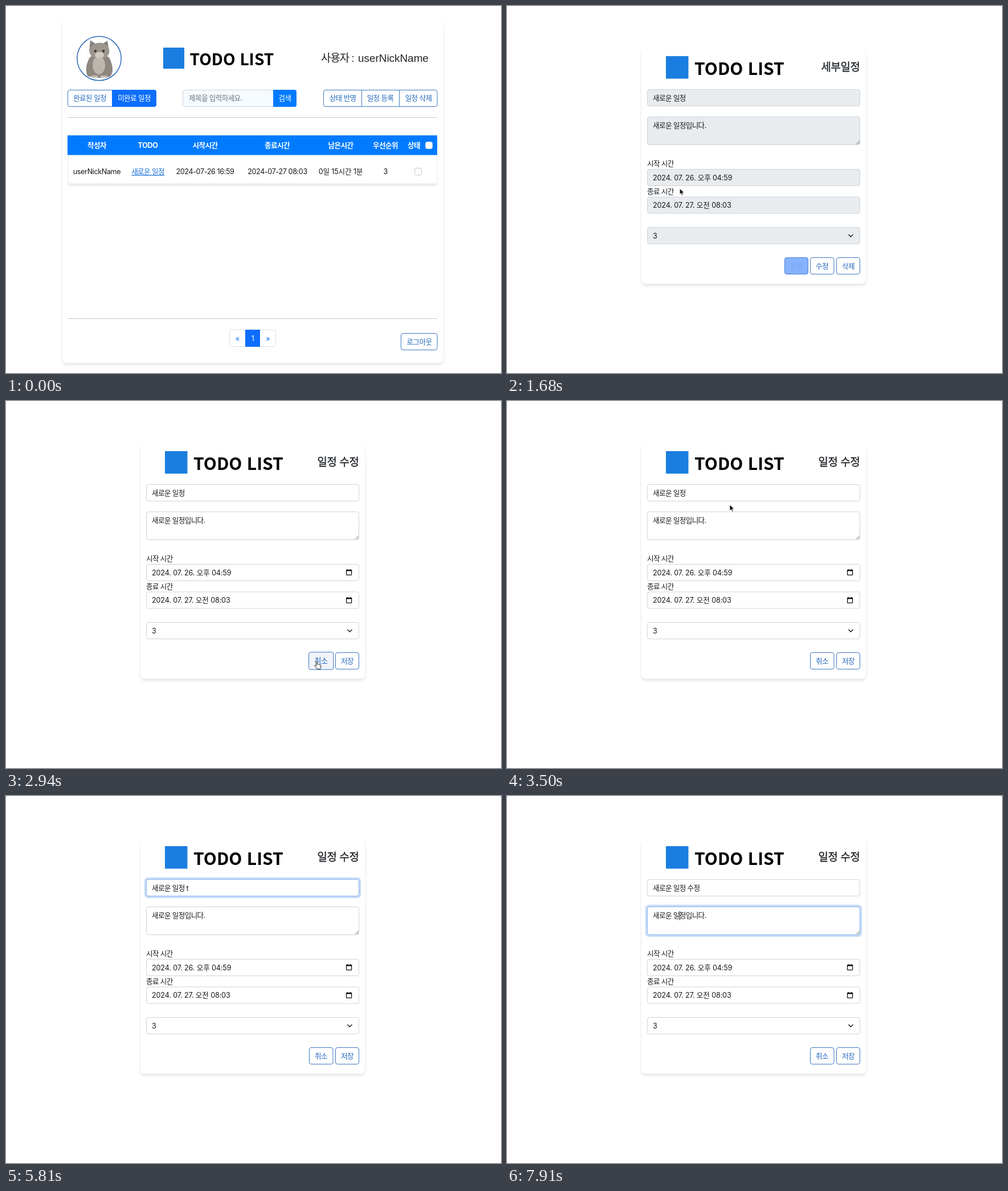
Write an HTML page that moves like this. It is 869x644 px and loops after 8000 ms.

```html
<!DOCTYPE html>
<html lang="ko">
<head>
<meta charset="utf-8">
<title>TODO LIST</title>
<style>
html, body { margin: 0; width: 100%; height: 100%; overflow: hidden; background: #888; }
svg { display: block; width: 869px; height: 644px; }
text { font: 12.6px Inter, "Noto Sans CJK KR", sans-serif; letter-spacing: -.05em; fill: #14171a; white-space: pre; }
.n { letter-spacing: -.03em; }
.date { letter-spacing: -.011em; }
.mid text, .mid { text-anchor: middle; }
.logo { font-family: "Noto Sans CJK KR", sans-serif; font-weight: 700; letter-spacing: 0; fill: #000; }
.head { font-family: "Liberation Sans", "Noto Sans CJK KR", sans-serif; font-size: 18.9px; fill: #212529; }
#heading { text-anchor: end; letter-spacing: -.02em; stroke: #212529; stroke-width: .35; }
.bold text { font-weight: 700; fill: #fff; }
.card { fill: #fff; filter: drop-shadow(0 3.2px 2.4px rgba(0, 0, 0, .11)); }
.mark { fill: #1a7ee0; }
.rule { stroke: #cbcbcb; }
.btn rect, .btn path { fill: #fff; stroke: #4079c2; }
.btn text { fill: #2468be; }
.btn .on { fill: #0d6efd; stroke: #0d6efd; }
.btn .white { fill: #fff; }
.btn .off { fill: #86b2fe; stroke: #4a82d8; }
.btn .faint { fill: #78a4f2; }
.btn.hover { transform: scale(1.045); transform-box: fill-box; transform-origin: center; }
.btn.hover rect { fill: #f0f4f9; }
.link { fill: #1a6fd6; text-decoration: underline; }
.link.hover { fill: #0a4c9c; }
.field { fill: #fff; stroke: #ced4da; }
.detail .field { fill: #e9ecef; }
.icon { fill: none; stroke: #111; stroke-width: 1.3; }
.ring rect { fill: none; stroke: #8db6ef; }
.ring .glow { stroke: #2f7de0; stroke-opacity: .27; stroke-width: 3.2; }
.popup text { font-size: 10.3px; font-weight: 500; fill: #fff; }
.popup { filter: drop-shadow(0 2px 2px rgba(0, 0, 0, .25)); }

.cursor { animation: move 8s linear infinite; }
.ring.one { animation: focus-one 8s linear infinite; }
.ring.two { animation: focus-two 8s linear infinite; }
.popup { animation: suggest 8s linear infinite; }
@keyframes move {
  0%, .875% { transform: translate(645px, 560px); animation-timing-function: cubic-bezier(.3, 0, .7, 1); }
  8.75% { transform: translate(163px, 71px); }
  10.5% { transform: translate(179px, 114px); animation-timing-function: cubic-bezier(.3, .4, .5, 1); }
  16.6%, 18.2% { transform: translate(256px, 293px); animation-timing-function: cubic-bezier(.4, 0, .6, 1); }
  28% { transform: translate(522px, 446px); }
  31.5% { transform: translate(535px, 455px); }
  34% { transform: translate(554px, 468px); }
  36% { transform: translate(552px, 461px); }
  38.5% { transform: translate(530px, 447px); }
  43.75% { transform: translate(391px, 182px); }
  46%, 100% { transform: translate(393px, 162px); }
}
@keyframes focus-one { 0%, 46.2% { opacity: 0; } 48.1%, 86.9% { opacity: 1; } 89.2%, 100% { opacity: 0; } }
@keyframes focus-two { 0%, 86.9% { opacity: 0; } 89.2%, 100% { opacity: 1; } }
@keyframes suggest {
  0%, 47.2% { opacity: 0; } 48.1%, 57.7% { opacity: 1; } 59.5%, 74.3% { opacity: 0; }
  75.2%, 77.9% { opacity: 1; } 80%, 100% { opacity: 0; }
}
</style>
</head>
<body>
<svg viewBox="0 0 869 644">
  <defs>
    <clipPath id="round"><circle cx="163.5" cy="92" r="38"/></clipPath>
    <g id="calendar">
      <rect class="icon" x=".6" y="1.6" width="9" height="8.8" rx="1"/>
      <path d="M0 1h10.2v2.6H0zM2 0h1.3v2H2zM7 0h1.3v2H7z" fill="#111"/>
    </g>
  </defs>
  <rect width="869" height="644" rx="1.6" fill="#fff"/>

  <g id="list">
    <rect class="card" x="99" y="24" width="668" height="602.5" rx="8"/>
    <g clip-path="url(#round)">
      <circle cx="163.5" cy="92" r="39" fill="#fff"/>
      <path d="M146 80L148 60L158 67H168L178 61L181 80Z" fill="#85807a"/>
      <path d="M147 90Q163 80 181 90Q192 112 183 124Q164 129 143 123Q137 108 147 90Z" fill="#8d8780"/>
      <ellipse cx="164" cy="79" rx="17.5" ry="14.5" fill="#9b958d"/>
      <ellipse cx="163" cy="104" rx="11" ry="16" fill="#bdb6ad"/>
      <ellipse cx="164" cy="86" rx="8" ry="5.5" fill="#cfc9c1"/>
      <path d="M150 122h11v4h-11zM166 122h12v4h-12z" fill="#c4beb6"/>
      <g fill="#3a3733"><circle cx="157" cy="79" r="2.2"/><circle cx="171" cy="79" r="2.2"/></g>
    </g>
    <circle cx="163.5" cy="92" r="38.7" fill="none" stroke="#2a69b8" stroke-width="1.5"/>
    <rect class="mark" x="276" y="73" width="37" height="37"/>
    <text class="logo" x="322.5" y="104" style="font-size:28.1px">TODO LIST</text>
    <text class="head" x="553" y="98">사용자 :</text>
    <text class="head" x="618" y="98" style="letter-spacing:0">userNickName</text>

    <g class="btn mid">
      <rect x="108.5" y="147.5" width="155" height="29" rx="3.5"/>
      <path class="on" d="M186.5 147.5h73.5q3.5 0 3.5 3.5v22q0 3.5-3.5 3.5h-73.5z"/>
      <text x="147" y="166">완료된 일정</text><text class="white" x="225" y="166">미완료 일정</text>
      <rect x="557.5" y="147.5" width="199.5" height="29" rx="3.5"/>
      <path d="M624.5 147.5v29M690.5 147.5v29"/>
      <text x="591" y="166">상태 반영</text><text x="657" y="166">일정 등록</text><text x="724" y="166">일정 삭제</text>
      <rect x="693.5" y="574.5" width="63.5" height="29" rx="3.5"/><text x="725.5" y="593.5">로그아웃</text>
    </g>
    <rect x="310.5" y="147.5" width="165" height="29" rx="3.5" fill="#f5fbff" stroke="#ced4da"/>
    <path d="M469 147h37.5q3.5 0 3.5 3.5v23q0 3.5-3.5 3.5h-37.5z" fill="#007bff"/>
    <text x="321" y="166" style="fill:#6c757d">제목을 입력하세요.</text>
    <text class="mid" x="489.5" y="166" style="fill:#fff">검색</text>
    <path class="rule" d="M108 195.5h649M108 548.5h649"/>

    <path d="M110 261h646v50.5H110z" class="card" style="filter:drop-shadow(0 3px 2px rgba(0,0,0,.12))"/>
    <rect x="108" y="227" width="649" height="34.5" fill="#007bff"/>
    <g class="bold mid">
      <text x="159.5" y="249">작성자</text><text class="n" x="249" y="249">TODO</text>
      <text x="349.5" y="249">시작시간</text><text x="476" y="249">종료시간</text>
      <text x="587.5" y="249">남은시간</text><text x="666" y="249">우선순위</text><text x="716" y="249">상태</text>
    </g>
    <rect x="736.5" y="238.5" width="12" height="12" rx="3" fill="#fff" stroke="#d5dbe2"/>
    <g class="mid">
      <text class="n" x="159.5" y="295.3">userNickName</text>
      <text class="link" x="249" y="295.3">새로운 일정</text>
      <text class="n" x="349.5" y="295.3">2024-07-26 16:59</text>
      <text class="n" x="476.5" y="295.3">2024-07-27 08:03</text>
      <text class="date" x="587.5" y="295.3">0일 15시간 1분</text>
      <text x="666" y="295.3">3</text>
    </g>
    <rect x="717.5" y="284.5" width="12" height="12" rx="3" fill="#fff" stroke="#bcc0c5"/>

    <rect x="392.5" y="568.5" width="81" height="29" rx="3.5" fill="#fff" stroke="#dee2e6"/>
    <rect x="420" y="568" width="26" height="30" fill="#0d6efd"/>
    <g class="mid">
      <text x="406" y="587.5" style="fill:#0d6efd">«</text>
      <text x="433" y="587.5" style="fill:#fff">1</text>
      <text x="459.5" y="587.5" style="fill:#0d6efd">»</text>
    </g>
  </g>

  <g id="form">
    <rect class="card" x="236" y="76" width="394" height="411.5" rx="8"/>
    <rect class="mark" x="279" y="88" width="39.5" height="39.5"/>
    <text class="logo" x="329" y="120.5" style="font-size:30px">TODO LIST</text>
    <text id="heading" class="head" x="619.5" y="114"></text>
    <g class="field">
      <rect x="246.5" y="146.5" width="373" height="29" rx="3.5"/>
      <rect x="246.5" y="194.5" width="373" height="49" rx="3.5"/>
      <rect x="246.5" y="286.5" width="373" height="29" rx="3.5"/>
      <rect x="246.5" y="335" width="373" height="29" rx="3.5"/>
      <rect x="246.5" y="388.5" width="373" height="29" rx="3.5"/>
    </g>
    <g class="ring one">
      <rect class="glow" x="244.4" y="144.4" width="377.2" height="33.2" rx="5"/>
      <rect x="246.5" y="146.5" width="373" height="29" rx="3.5"/>
    </g>
    <g class="ring two">
      <rect class="glow" x="244.4" y="192.4" width="377.2" height="53.2" rx="5"/>
      <rect x="246.5" y="194.5" width="373" height="49" rx="3.5"/>
    </g>
    <path d="M613 242.5l6-6M616.5 242.5l2.5-2.5" stroke="#555" stroke-width=".9"/>
    <text id="title" x="256" y="165.5"></text>
    <text id="memo" x="256" y="214.3">새로운 일정입니다.</text>
    <text x="246" y="280.7">시작 시간</text>
    <text class="date" x="256" y="305.5">2024. 07. 26. 오후 04:59</text>
    <text x="246" y="329.5">종료 시간</text>
    <text class="date" x="256" y="354.2">2024. 07. 27. 오전 08:03</text>
    <text x="256" y="407.8">3</text>
    <path class="icon" d="M599.5 401l4 4 4-4"/>
    <g id="dates">
      <use href="#calendar" x="597" y="295"/><use href="#calendar" x="597" y="344"/>
    </g>
    <g class="btn mid" id="submit">
      <rect class="off" x="487.5" y="441.5" width="41" height="29" rx="3.5"/>
      <text class="faint" x="508" y="460.7">등록</text>
    </g>
    <g class="btn mid" id="left"><rect x="532.5" y="441.5" width="41.5" height="29" rx="3.5"/><text x="553" y="460.7"></text></g>
    <g class="btn mid" id="right"><rect x="578.5" y="441.5" width="41" height="29" rx="3.5"/><text x="599" y="460.7"></text></g>
    <rect id="caret" width="1" height="16" fill="#111"/>
    <g class="popup">
      <path d="M332 184l6-5.8q2-1.8 4 0l6 5.8z" fill="#1c1c1c"/>
      <rect id="sheet" x="323.5" y="183" width="123" rx="5" fill="#1c1c1c"/>
    </g>
  </g>

  <g class="cursor">
    <path id="arrow" d="M0 0V10.5L2.5 8.3L4.2 12.2L6 11.4L4.3 7.6H7.6Z" fill="#000" stroke="#fff" stroke-width=".8"/>
    <path id="hand" transform="translate(-4)" d="M3.2 1.2c0-1.6 2.2-1.6 2.2 0v4.3c.8-.7 2-.4 2.2.3.8-.5 1.8-.2 2 .6.8-.3 1.9 0 1.9 1.1v2.5c0 1-.9 2.2-1 3.6H4.7c-.3-1.8-2.6-3.5-3.8-5.2-.8-1.2.7-2 1.6-1.1l.7.8z" fill="#fff" stroke="#111"/>
    <path id="beam" d="M-2.5-5.5q2.5 0 2.5 1.5 0-1.5 2.5-1.5M0-4v9M-2.5 6.5q2.5 0 2.5-1.5 0 1.5 2.5 1.5M-1.3 2h2.6" fill="none" stroke="#222"/>
  </g>
</svg>
<script>
const $ = id => document.getElementById(id);
const LOOP = 8000, BASE = '새로운 일정';
const LEAD = 20; // about one screen refresh, so steps are painted on time

// Stepped timelines: [start time, value]
const page = [[0, 'list'], [1540, 'detail'], [2800, 'edit']];
const pointer = [[0, ''], [70, 'arrow'], [920, 'hand'], [1010, 'arrow'], [1180, 'hand'], [1540, 'arrow'],
  [2450, 'hand'], [2960, 'arrow'], [3400, 'beam'], [3480, 'arrow'], [3560, 'beam'], [4550, '']];
const typed = [[0, ''], [4550, ' '], [4690, ' t'], [4830, ' tn'], [4900, ' tnw'], [5040, ' tnwj'], [5110, ' tnwjd '],
  [5250, ' tnwjd'], [5390, ' tnwj'], [5530, ' tnw'], [5670, ' tn'], [5810, ' t'], [5950, ' '],
  [6160, ' ㅅ'], [6230, ' 수'], [6370, ' 숮'], [6440, ' 수저'], [6580, ' 수정']];
const caretOn = [[0, false], [3780, true], [4270, false], [4550, true], [5670, false], [5950, true]];
const memoCaret = [[0, -1], [7000, 0], [7280, 1], [7490, 2], [7630, 3], [7700, 4], [7910, 5]];

const valueAt = (steps, t) => steps.findLast(([start]) => start <= t)[1];
const show = (el, on) => { el.style.display = on ? '' : 'none'; };

const options = [' 추가', '', ' 등록', '(1)', '(2)', '(3)'].map(end => {
  const row = document.createElementNS('http://www.w3.org/2000/svg', 'text');
  row.textContent = BASE + end;
  row.setAttribute('x', 333);
  $('sheet').after(row);
  return row;
});

function drawPopup(t) {
  const narrowed = t >= 4550;
  const visible = options.filter((_, i) => !narrowed || i === 0 || i === 2);
  options.forEach(row => show(row, visible.includes(row)));
  visible.forEach((row, i) => row.setAttribute('y', 204.5 + 28.3 * i));
  $('sheet').setAttribute('height', 6 + 28.3 * visible.length);
}

function drawCaret(t) {
  const at = valueAt(memoCaret, t), inMemo = at >= 0;
  const width = inMemo ? (at && $('memo').getSubStringLength(0, at)) : $('title').getComputedTextLength();
  $('caret').setAttribute('x', Math.round(256 + width));
  $('caret').setAttribute('y', inMemo ? 202 : 153);
  show($('caret'), valueAt(caretOn, t));
}

function draw(t) {
  const name = valueAt(page, t), editing = name === 'edit';
  show($('list'), name === 'list');
  show($('form'), name !== 'list');
  $('form').setAttribute('class', name);
  $('heading').textContent = editing ? '일정 수정' : '세부일정';
  $('left').lastChild.textContent = editing ? '취소' : '수정';
  $('right').lastChild.textContent = editing ? '저장' : '삭제';
  show($('submit'), !editing);
  show($('dates'), editing);
  $('left').classList.toggle('hover', t >= 2450 && t < 2960);
  document.querySelector('.link').classList.toggle('hover', t >= 1180);
  for (const id of ['arrow', 'hand', 'beam']) show($(id), valueAt(pointer, t) === id);
  $('title').textContent = BASE + valueAt(typed, t);
  if (name !== 'list') {
    drawPopup(t);
    drawCaret(t);
  }
}

// Follow the CSS clock so script and keyframes stay together.
const clock = document.querySelector('.cursor').getAnimations()[0];
function tick() {
  draw(((clock?.currentTime ?? performance.now()) + LEAD) % LOOP);
  requestAnimationFrame(tick);
}
tick();
</script>
</body>
</html>
```
